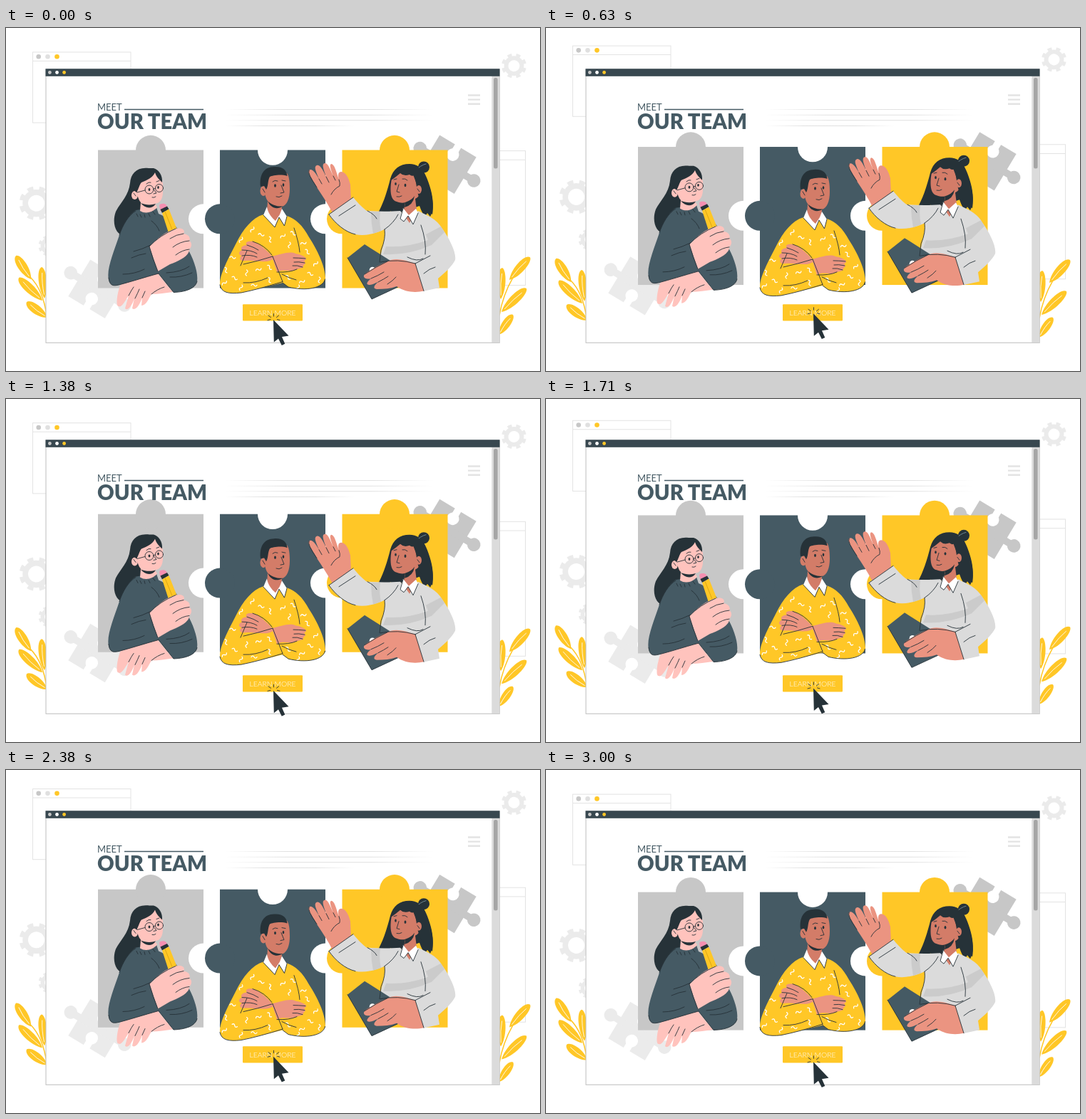
These frames come from a looping animation (749x482 px, 3.04 s). An HTML page:

```html
<!DOCTYPE html>
<html lang="en">
<head>
<meta charset="utf-8">
<title>Our team</title>
<style>
html, body { margin: 0; width: 100%; height: 100%; overflow: hidden; background: #fff; }
svg { display: block; width: 749px; height: 482px; }
text { font-family: Lato, "Open Sans", sans-serif; fill: #455a64; }
.ln { fill: none; stroke: #263238; stroke-width: .9; stroke-linecap: round; stroke-linejoin: round; }
.ink { fill: #263238; }
.slate { fill: #455a64; }
.sun { fill: #ffc727; }
.gray { fill: #c7c7c7; }
.pale { fill: #ebebeb; }
.knit { fill: #dbdbdb; }
.band { fill: #c7c7c7; }
.pink { fill: #ffc3bd; }
.tan { fill: #eb9481; }
.brown { fill: #d37c68; }
.white { fill: #fff; }
.frame { fill: #fff; stroke: #e3e3e3; }
</style>
</head>
<body>
<svg viewBox="0 0 749 482" xmlns="http://www.w3.org/2000/svg">
  <defs>
    <linearGradient id="fade">
      <stop offset="0" stop-color="#ddd" stop-opacity="0"/>
      <stop offset=".3" stop-color="#ddd"/>
      <stop offset=".7" stop-color="#ddd"/>
      <stop offset="1" stop-color="#ddd" stop-opacity="0"/>
    </linearGradient>
    <g id="jigsaw">
      <rect x="-30" y="-30" width="60" height="60"/>
      <path d="M-45 -5H45V5H-45Z"/>
      <circle cx="-44" r="9.3"/><circle cx="44" r="9.3"/>
      <path class="white" d="M-5 -31H5V-20H-5ZM-5 31H5V20H-5Z"/>
      <circle class="white" cy="-16" r="8.8"/><circle class="white" cy="16" r="8.8"/>
    </g>
  </defs>

  <g data-move="quick">
    <rect class="frame" x="37.5" y="34.3" width="137.5" height="99.2"/>
    <path class="frame" d="M37.5 46.8H175"/>
    <circle class="gray" cx="45.7" cy="40.6" r="3.3"/>
    <circle cx="58.5" cy="40.6" r="3.3" fill="#e0e0e0"/>
    <circle class="sun" cx="71.5" cy="40.6" r="3.3"/>
    <rect class="frame" x="600.5" y="173" width="128" height="189"/>
    <path class="frame" d="M600 185.7H728.5"/>
    <g id="gears"></g>
  </g>
  <g data-move="sway" id="leaves"></g>

  <rect x="56" y="58" width="636.3" height="384.3" fill="#fff" stroke="#bdbdbd"/>
  <rect x="681.3" y="67.5" width="11" height="374.5" fill="#dbdbdb"/>
  <rect x="684" y="70" width="5.6" height="127.5" rx="2.5" fill="#a6a6a6"/>
  <rect x="55.5" y="57.3" width="637" height="10.5" fill="#37474f"/>
  <circle class="gray" cx="61.4" cy="62.5" r="2.4"/>
  <circle class="white" cx="71.5" cy="62.5" r="2.4"/>
  <circle class="sun" cx="81.6" cy="62.5" r="2.4"/>
  <path d="M648 94.5H665M648 100.6H665M648 106.7H665" stroke="#e3e3e3" stroke-width="2.4"/>
  <g fill="url(#fade)">
    <rect x="307" y="114.1" width="292" height=".9"/>
    <rect x="307" y="121.8" width="292" height=".9"/>
    <rect x="307" y="129.3" width="294" height=".9"/>
    <rect x="307" y="137" width="182" height=".9"/>
  </g>

  <g data-move="slow">
    <use href="#jigsaw" class="gray" transform="translate(618.5 192) rotate(31)"/>
    <use href="#jigsaw" class="pale" transform="translate(128.5 367) rotate(31)"/>
    <g class="gray"><rect x="129" y="171.7" width="148" height="194"/><circle cx="203" cy="172" r="21"/></g>
    <circle class="white" cx="277" cy="268.5" r="21"/>
    <g class="slate"><rect x="300" y="171.7" width="148" height="194"/><circle cx="300" cy="268.5" r="21"/></g>
    <circle class="white" cx="374" cy="172" r="21"/>
    <circle class="white" cx="448" cy="268.5" r="21"/>
    <g class="sun"><rect x="471.5" y="171.7" width="148" height="194"/><circle cx="545" cy="172" r="21"/><circle cx="471" cy="268.5" r="21"/></g>
  </g>
  <text x="128" y="115.5" font-size="13">MEET</text>
  <path d="M166 114.6H277" stroke="#455a64" stroke-width="1.5"/>
  <text x="128" y="142" font-size="29.2" font-weight="900">OUR TEAM</text>

  <!-- woman with pencil -->
  <g data-move="girl">
    <path class="ink" d="M200 197C184 195 175 204 174 218C172 236 160 246 154 258C148 274 154 292 167 292C180 290 190 276 192 260L212 226Z"/>
    <path class="pink" d="M212 344C190 348 168 354 160 362C155 376 154 392 158 391C162 394 168 382 172 376L167 394C170 398 176 392 180 380L177 394C182 398 188 388 191 379L190 390C197 390 200 380 204 374C214 374 224 372 234 371Z"/>
    <path class="ln" d="M172 376Q176 368 179 364M181 380Q185 372 187 367M191 379L195 370M204 374Q212 367 222 364" stroke-width=".7"/>
    <path class="slate" d="M182 256C172 263 164 276 159 291C152 312 142 336 143.500 350C145 362 150 363 158 361C174 357 192 351 214 345L235 371.500C252 371 266 366 268 356C270 342 262 322 252 305C246 288 236 270 214 261L211 252Z"/>
    <path class="ln" d="M182 257C172 263 164 276 159 291M144 351C145 362 150 363 158 361C174 357 192 351 214 345M214 345L235 371.500C252 371 266 366 268 356M179 314Q191 311 203 305M164 346Q180 346 194 339M176 323Q187 318 196 317M225 344Q246 343 257 335M230 350Q246 351 261 344M204 271Q212 277 215 285M183 261L185 265M188 262L190 266M194 262L195 266M200 261L202 265M206 258L209 262"/>
    <path class="pink" d="M184 214C183 226 183 238 189 245L188 257C196 262 206 259 212 252L209 247C217 246 220 239 220 230C222 214 216 203 204 203C192 202 186 208 184 214Z"/>
    <ellipse class="pink" cx="180.500" cy="235" rx="4.500" ry="6"/>
    <path class="ink" d="M200 197C186 198 177 208 177 226L183 231C186 227 187 220 190 217C198 214 206 210 209 203C211 210 216 214 219 217C220 207 214 199 207 197Z"/>
    <path class="ink" d="M189 246C196 249 204 249 210 247C205 255 195 254 189 246Z"/>
    <g class="ln">
      <circle cx="201" cy="227" r="6"/><circle cx="215" cy="225" r="5.500"/>
      <path d="M207 226L209.500 225.500M195 228L184 231M197 219Q200 216 203 217M211 216L215 214.500M205 238Q208 239 210 237M208 228L211 232L207 233"/>
      <path d="M179 232L182 236M212 204Q217 209 218 214"/>
    </g>
    <ellipse class="ink" cx="201" cy="227" rx="1.400" ry="2"/><ellipse class="ink" cx="213.500" cy="224" rx="1.300" ry="1.900"/>
    <path fill="#f48fb1" d="M215.500 252Q214 247 219 247Q224 246 226 251L217 258Z"/>
    <path class="ink" d="M216.500 255L226 250.500L228.500 254.500L219 260Z"/>
    <path class="sun" d="M219 260L228.500 254.500L241 286L230 294Z"/>
    <path class="ln" d="M223 258L235 288" style="stroke:#d9a312"/>
    <path class="pink" d="M201 307C212 296 225 285 238 282C247 280 252 284 249 289C257 290 259 296 257 299C262 302 260 309 257 311C258 319 244 327 230 332L213 342Z"/>
    <path class="ln" d="M249 289Q239 290 230 296M257 299Q244 300 234 308M257 311Q247 312 238 319M201 307Q206 325 213 342M201 307Q216 291 238 282"/>
  </g>

  <!-- man with crossed arms -->
  <g data-move="sway">
    <path class="brown" d="M362 208C361 220 362 236 367 243L366 258L378 278L386 264L387 251C394 249 398 240 398 226C398 215 397 208 394 204Z"/>
    <ellipse class="brown" cx="361" cy="229" rx="4.500" ry="7"/>
    <path class="ink" d="M357 223C355 206 362 195 376 195C388 194 394 200 394.500 208C386 205 374 207 370 209C367 214 368 222 365 227L362 222Z"/>
    <path class="ink" d="M367 243C373 249 380 251 388 250.500C380 256 371 253 367 243Z"/>
    <path class="ln" d="M386 221L390 231L385 232M379 237Q383 239 387 236M374 216Q377 213 381 215M387 214L392 215M360 226L363 231"/>
    <ellipse class="ink" cx="377.500" cy="221.500" rx="1.400" ry="2.200"/><ellipse class="ink" cx="389" cy="220.500" rx="1.300" ry="2.200"/>
    <path class="sun" d="M361 262C345 267 333 282 322 304C312 324 300 345 300 360C301 371 312 374 330 372L388 358L396 364C420 370 445 366 448 352C448 336 437 312 425 294C416 277 406 268 394 264L390 278L384 264L377 280Z"/>
    <path class="white" d="M366 251L361 263L377 280L383 266L390.500 278L394 265L387 254L384 262L378 271C372 266 367 259 366 251Z"/>
    <path class="ln" d="M361 263L377 280L383 266L390.500 278L394 265" stroke-width=".6"/>
    <path class="tan" d="M376 324C366 312 356 303 346 300C340 299 334 301 338 305C332 305 328 309 331 312C326 314 325 319 331 320C326 323 328 328 335 327C348 326 360 330 370 327Z"/>
    <path class="ln" d="M338 305Q348 308 354 312M331 312Q344 312 352 317M331 320Q343 318 352 322M346 300Q363 305 373 319" stroke-width=".7"/>
    <g id="flecks" fill="none" stroke="#fff" stroke-width="1.300" stroke-linecap="round"></g>
    <path class="tan" d="M373 321C385 318 398 313 406 317C412 318 420 321 421 324C421 327 416 326 420 330C419 333 416 333 417 336C414 338 410 338 406 340C398 343 388 338 380 343Z"/>
    <path class="ln" d="M420 324Q410 323 403 323M419 330Q410 328 404 329M416 336Q408 333 402 334M374 321L388 356.500M374 321Q352 328 333 332M388 356.500Q355 367 330 372C312 374 302 372 300 361M388 358L396 364C420 370 445 366 447.500 353M380 343Q397 344 408 339M404 281Q411 302 412 315M338 313L329 334M387 346Q398 352 407 354M333 358Q350 359 367 351"/>
  </g>

  <!-- waving woman -->
  <g data-move="quick" >
    <g transform="translate(0 .4)">
    <path class="ink" d="M566 191C552 191 543 198 539 212C534 232 528 250 520 263C524 266 528 263 531 260L529 265Q535 265 540 257L540 264L580 250C585 264 588 266 591 260L595 265C603 250 597 226 589 208C584 196 576 191 566 191Z"/>
    <circle class="ink" cx="586" cy="195.500" r="8"/>
    <path class="ln" d="M575 200Q581 193 589 191" style="stroke:#78909c" stroke-width=".6"/>
    <path class="tan" d="M459 262C452 248 444 236 436 224C430 212 422 204 425 200C429 196 435 205 439 212C435 202 431 195 436 193C441 191 446 203 449 209C446 200 442 191 447 190C452 189 455 200 459 208C456 200 453 193 456 191C461 191 463 202 467 213C465 207 466 202 470 202C477 202 481 212 483 220L484 242L468 264Z"/>
    <path class="ln" d="M439 212L443 219M449 209L453 217M459 208L462 214M467 213Q469 218 468 222Q460 226 456 234M425 200Q422 204 436 224" stroke-width=".8"/>
    <path class="knit" d="M553 257C540 258 522 258 506 257C499 252 492 244 487 238L452.500 262C462 275 476 287 490 290C505 293 520 288 531 283C533 296 526 312 524 329L574 331L585 370L608 365L606 352C618 342 626 334 630 326C632 316 622 296 612 282C604 268 590 263 578 257L566 272Z"/>
    <path class="band" d="M512 258L525 258Q523 272 526 285L515 289Q512 274 512 258ZM533 307Q562 309 592 298L589 290L610 279L615 287L597 305Q564 320 529 318Z" opacity=".8"/>
    <path class="brown" d="M541 212C538 228 539 242 548 244C553 246 557 246 560 245L557 261L566 274L576 256L574 240C583 236 585 222 577 222L571 206L552 200Z"/>
    <path class="ink" d="M560 245Q569 242 573 236Q571 249 559 252Z"/>
    <path class="ink" d="M540 214C542 200 552 192 566 192C578 192 586 202 589 210C596 226 601 246 598 262Q590 257 584 248C577 238 577 226 573 207Q569 209 566 206Q558 209 553 204Q546 210 540 214Z"/>
    <ellipse class="brown" cx="579" cy="227" rx="4" ry="6"/>
    <path class="ln" d="M551 220L548 230L552 231M548 237Q552 238 555 236M544 213L548 212M556 212Q560 211 563 214M577 226L580 230"/>
    <ellipse class="ink" cx="546.500" cy="219" rx="1.300" ry="2.100"/><ellipse class="ink" cx="560" cy="221" rx="1.400" ry="2.200"/>
    <path class="white" d="M557 253L552.500 268L558 272L564 264L571 276L578 260L575 254L565 263Z"/>
    <path class="ln" d="M557 254L553 268L558 272L564 264L571 276L578 260" stroke-width=".6"/>
    <path class="slate" d="M503 304L479 323L513 381L556 361L544 330Z"/>
    <path class="ln" d="M479 323L513 381L556 361"/>
    <circle class="white" cx="514" cy="340" r="4.300"/>
    <path class="tan" d="M574 331C560 326 545 322 535 328C525 332 510 340 503 346C499 351 506 354 512 352C506 357 504 361 510 361C514 361 518 358 522 357C516 362 514 366 520 367C530 367 540 366 548 363C560 372 576 372 586 369.500Z"/>
    <path class="ln" d="M512 352Q522 348 530 343M522 357Q530 353 536 349M535 360Q543 355 547 350M503 346Q520 335 535 328M574 331L586 369.500M574 331L595 320M525 329Q550 324 574 331M531 283Q533 296 526 312L524 329M531 283Q544 274 550 262M487 238L453 262M453 262C462 275 476 287 490 290M467 264L490 249M582 277Q590 300 588 318M586 345Q594 338 602 336M507 257Q517 262 520 268M563 322Q577 329 585 324"/>
    </g>
  </g>

  <rect class="sun" x="332" y="388.300" width="84" height="23.200" rx="1"/>
  <text x="374" y="403.600" font-size="10.400" font-weight="300" text-anchor="middle" style="fill:#fff">LEARN MORE</text>
  <g data-move="quick">
    <path class="ink" d="M375 410.500L375.800 442L382 437L386.800 446.300L391.300 444.200L387 434.500L396.500 433Z"/>
    <path class="ln" d="M371 410L367 411M371.500 407L368 404.500M375.500 405.500V402M379.500 407L382.500 404.500M380.500 410L384 411" stroke-width="1.200"/>
  </g>
</svg>
<script>
const add = (id, html) => document.getElementById(id).insertAdjacentHTML('beforeend', html);

function gear(x, y, r, hole) {
  const body = r * .82, ring = r * .2;
  return `<g transform="translate(${x} ${y}) rotate(11.25)">
    <circle class="pale" r="${body}"/>
    <circle r="${r - ring / 2}" fill="none" stroke="#ebebeb" stroke-width="${ring + 1}" pathLength="16" stroke-dasharray="1 1"/>
    <circle class="white" r="${hole}"/></g>`;
}

// A leaf drawn along the x axis, then turned from its base towards its tip.
function leaf(x, y, tipX, tipY, w) {
  const len = Math.hypot(tipX - x, tipY - y);
  const turn = Math.atan2(tipY - y, tipX - x) * 180 / Math.PI;
  return `<g transform="translate(${x} ${y}) rotate(${turn})">
    <path class="sun" d="M0 0C${len * .3} ${-w} ${len * .95} ${-w} ${len} 0C${len * .95} ${w * .8} ${len * .3} ${w} 0 0Z"/>
    <path d="M${len * .12} 0Q${len * .5} -2 ${len * .82} 0" fill="none" stroke="#fff" stroke-width=".8"/></g>`;
}

const stem = d => `<path d="${d}" fill="none" stroke="#ffc727" stroke-width="1.5"/>`;

add('gears', gear(712.5, 53.6, 17, 8) + gear(42.5, 246.6, 23.5, 11.5) + gear(60, 306.5, 14, 6));
add('leaves',
  stem('M34 350Q52 368 57 404') + stem('M711 351Q697 375 692 404') +
  leaf(35, 353, 14, 320, 9) + leaf(54, 380, 50, 336, 8) + leaf(51, 383, 18, 351, 9) + leaf(58, 407, 29, 385, 9) +
  leaf(706, 354, 735, 322, 9) + leaf(694, 381, 696, 337, 8) + leaf(695, 399, 730, 366, 9) + leaf(691, 431, 711, 403, 8));

const spots = [[345, 283], [358, 290], [371, 297], [388, 292], [403, 288], [398, 305], [417, 302], [423, 314],
  [330, 298], [318, 322], [309, 340], [306, 358], [321, 351], [338, 344], [354, 339], [370, 336], [330, 365],
  [348, 361], [370, 354], [434, 331], [427, 345], [440, 354], [415, 356], [396, 350], [410, 365]];
add('flecks', spots.map(([x, y], i) =>
  `<path transform="translate(${x} ${y}) rotate(${i * 67 % 180 - 60})" d="M-4 .5q2-3 4 0t4 0"/>`).join(''));

const LOOP = 3040, STEP = LOOP / 73;
// Time in ms against progress through the loop.
const pace = [[0, .01], [380, .142], [880, .314], [1380, .486], [2080, .728], [2630, .881], [3000, .996], [3040, 1.01]];

function progress(t) {
  const i = Math.max(1, pace.findIndex(([ms]) => ms >= t));
  const [t0, p0] = pace[i - 1], [t1, p1] = pace[i];
  return p0 + (p1 - p0) * (t - t0) / (t1 - t0);
}

const tri = x => 1 - Math.abs(1 - 2 * (x - Math.floor(x)));

const moves = {
  slow: p => -10.3 * tri(p),
  quick: p => -10.2 * tri(2 * p),
  sway: p => 11 * tri(2 * p - .147) - 2.8,
  girl: p => p < .147 ? 0 : -10 * tri(2 * p - .294)
};

const parts = [...document.querySelectorAll('[data-move]')];
const start = performance.now();

function draw(now) {
  const step = Math.floor(Math.max(0, now - start) % LOOP / STEP + .2) % 73;
  const p = progress(step * STEP);
  for (const part of parts)
    part.setAttribute('transform', `translate(0 ${moves[part.dataset.move](p).toFixed(2)})`);
  requestAnimationFrame(draw);
}
draw(start);
</script>
</body>
</html>
```
